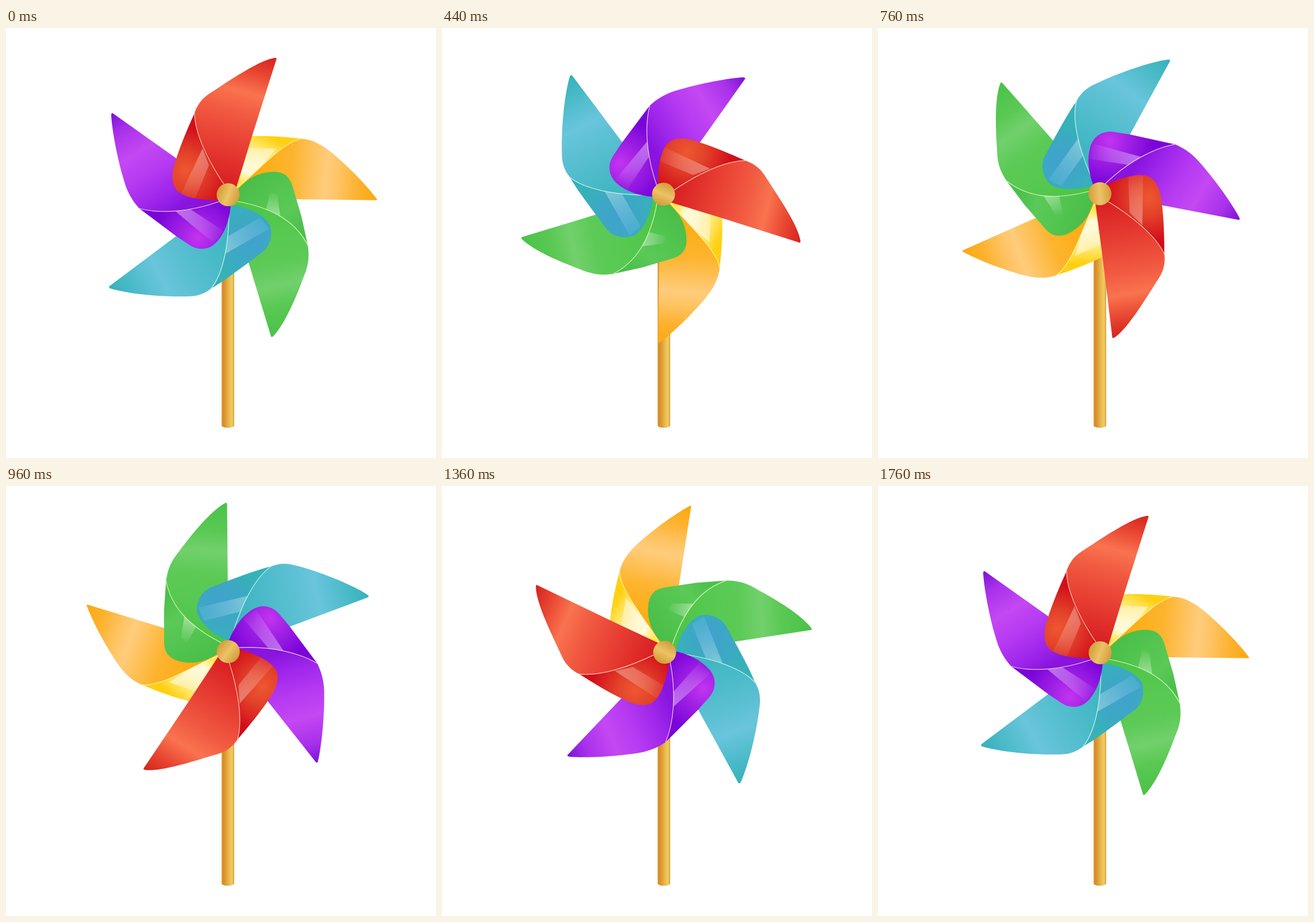
An HTML page that plays this animation: 748 by 748 pixels, repeating every 2 s.

```html
<!DOCTYPE html>
<html lang="en">
<head>
<meta charset="utf-8">
<title>Pinwheel</title>
<style>
  html, body { margin: 0; width: 100%; height: 100%; overflow: hidden; background: #fff; }
  svg { display: block; width: 100vw; height: 100vh; }
</style>
</head>
<body>
<svg id="stage" viewBox="0 0 748 748">
  <defs id="defs"></defs>
  <path d="M375,290H397V692C394,696.5 378,696.5 375,692Z" fill="url(#stick)"/>
  <g id="wheel"></g>
</svg>
<script>
const PIVOT = '386.4 289.1';
const STEP_MS = 40, STEPS = 44, LOOP_MS = 2000;
const defs = document.getElementById('defs');
const wheel = document.getElementById('wheel');

function add(parent, tag, attrs) {
  const el = document.createElementNS('http://www.w3.org/2000/svg', tag);
  for (const key in attrs) el.setAttribute(key, attrs[key]);
  return parent.appendChild(el);
}

// stops: "offset color [opacity]" separated by commas
function gradient(id, coords, stops) {
  const radial = coords.length === 3;
  const names = radial ? ['cx', 'cy', 'r'] : ['x1', 'y1', 'x2', 'y2'];
  const attrs = { id, gradientUnits: 'userSpaceOnUse' };
  names.forEach((name, i) => attrs[name] = coords[i]);
  const el = add(defs, radial ? 'radialGradient' : 'linearGradient', attrs);
  for (const stop of stops.split(',')) {
    const [offset, color, opacity = 1] = stop.trim().split(' ');
    add(el, 'stop', { offset, 'stop-color': color, 'stop-opacity': opacity });
  }
}

// tip: ridge start to the point; edge: point to hub; ridge: the fold, from start to hub;
// flap: from the hub round the folded corner and back to the ridge start
const blades = [
  {
    name: 'yellow', start: '514,192.5', line: '#fff2a8',
    tip: 'C545,195 568,216 604,251 C624,271 639,289 645.5,298 Q646,299.6 643,299.6',
    edge: 'L506,298 L386,295', ridge: 'C480,199 440,248 399,281',
    flap: 'L388,290 L415,189 C440,186.5 485,188.5 514,192.5Z',
    fill: [[400, 270, 645, 290], '0 #fca803, .38 #fdb42e, .63 #ffcc7c, .72 #fec464, .86 #fdb230, 1 #fca80e'],
    flapFill: [[408, 268, 448, 184], '0 #ffe650, .22 #fffbdc, .5 #fff3b0, .74 #ffe668, 1 #ffd010'],
    shine: 'M470,210 L414,208 L405,238 L437,248Z',
    shineFill: [[460, 212, 405, 225], '0 #fff .5, 1 #fff .15']
  },
  {
    name: 'green', start: '525,378', line: '#d6f6b4',
    tip: 'C528,400 526,414 517,435 C504,470 485,515 465,536 Q461.5,539.5 460.5,535',
    edge: 'L422,408 L388,297', ridge: 'C506,340 468,313 399,301',
    flap: 'L390,290 L401,284 C418,262 440,250 467,250 C486,251 494,260 499,277 L514,328 L525,378Z',
    fill: [[430, 305, 480, 540], '0 #4cc546, .25 #57c951, .45 #5bca56, .62 #72d06c, .76 #5ac953, 1 #48c148'],
    flapFill: [[420, 265, 515, 350], '0 #49be48, .4 #53c550, .7 #5bc957, 1 #4cbf4c'],
    shine: 'M452,317 L478,334 L472,290 L460,284Z',
    shineFill: [[464, 328, 465, 282], '0 #fff .42, 1 #fff 0']
  },
  {
    name: 'teal', start: '357,453', line: '#c6f2ee',
    tip: 'C344,463 333,467 313,467 C268,468 210,462 181,453 Q178,451.5 180,449',
    edge: 'L296,362 L387,294', ridge: 'C377,428 389,378 388,303',
    flap: 'L390,300 L392,308 C420,311 448,325 457,339 C465,354 462,377 447,389 L422,408 C400,424 378,441 357,453Z',
    fill: [[185, 455, 390, 345], '0 #38b2bd, .14 #4abac8, .36 #69c5dc, .52 #5cc0d3, .76 #4abac9, 1 #3ab4be'],
    flapFill: [[428, 370, 74], '0 #40a2cd, .5 #3da8c4, 1 #36b2b8'],
    shine: 'M385,363 L442,330 L458,349 L381,393Z',
    shineFill: [[381, 385, 455, 340], '0 #fff .34, 1 #8fd0ff .14']
  },
  {
    name: 'purple', start: '232,314', line: '#f0c4e4',
    tip: 'C222,303 215,292 209,277 C195,236 184,176 183,151 Q183.5,147 186,148.5',
    edge: 'L298,228 L386,290', ridge: 'C266,323 318,321 374,301',
    flap: 'L386,296 L391,306 C389,338 379,358 367,372 C354,386 336,388 320,378 L296,362 L232,314Z',
    fill: [[184, 150, 290, 320], '0 #7d14d8, .16 #a830ea, .4 #c448f3, .62 #b539f1, .85 #9c24ea, 1 #8814de'],
    flapFill: [[333, 366, 76], '0 #c434f0, .4 #a222e6, 1 #7a05d8'],
    shine: 'M295,319 L319,314 L378,353 L361,374Z',
    shineFill: [[305, 314, 368, 364], '0 #fff .4, 1 #fff .04']
  },
  {
    name: 'red', start: '328,148', line: '#fbc6a4',
    tip: 'C331,138 339,123 354,114 C400,84 440,57 467,52 Q471.5,51.5 470.5,54',
    edge: 'L428,188 L399,283 L386,290', ridge: 'C328,182 351,231 382,276',
    flap: 'L386,300 L366,300 C328,299 302,292 294,278 C288,267 288,250 295,231 C303,205 317,172 328,148Z',
    fill: [[436, 32, 374, 265], '0 #d01c1d, .06 #d8261f, .2 #ea4a34, .34 #f9734f, .5 #f15a41, .7 #e94235, 1 #da2124'],
    flapFill: [[312, 248, 76], '0 #ee5731, .4 #e3422a, 1 #d20e1b'],
    shine: 'M342,209 L353,239 L328,299 L305,288Z',
    shineFill: [[348, 222, 316, 294], '0 #fff .33, 1 #fff .06']
  }
];

gradient('stick', [375, 0, 397, 0],
  '0 #e9a23c, .12 #d98a25, .3 #dc9a35, .6 #e9bb50, .82 #f0cc64, 1 #d9a53c');
gradient('hub', [368, 283, 405, 297], '0 #d39d38, .5 #ebc366, 1 #d59c3c');

for (const b of blades) {
  const id = part => b.name + '-' + part;
  gradient(id('main'), ...b.fill);
  gradient(id('flap'), ...b.flapFill);
  gradient(id('shine'), ...b.shineFill);
  const fold = `M${b.start}${b.ridge}`;
  const flap = fold + b.flap;
  const clip = add(defs, 'clipPath', { id: id('clip') });
  add(clip, 'path', { d: flap });
  add(wheel, 'path', { d: flap, fill: `url(#${id('flap')})` });
  add(wheel, 'path', { d: b.shine, fill: `url(#${id('shine')})`, 'clip-path': `url(#${id('clip')})` });

  // The main sheet closes back along the fold, so reverse its curve.
  const [c1, c2, end] = b.ridge.slice(1).split(' ');
  add(wheel, 'path', {
    d: `M${b.start}${b.tip}${b.edge}L${end}C${c2} ${c1} ${b.start}Z`,
    fill: `url(#${id('main')})`
  });
  add(wheel, 'path', { d: fold, fill: 'none', stroke: b.line, 'stroke-width': 1.2 });
}
add(wheel, 'circle', { cx: 386.4, cy: 290.1, r: 20, fill: 'url(#hub)' });

const begin = performance.now();
function draw() {
  const t = (performance.now() - begin) % LOOP_MS;
  const step = Math.min(Math.floor(t / STEP_MS), STEPS);
  wheel.setAttribute('transform', `rotate(${step * 360 / STEPS} ${PIVOT})`);
  requestAnimationFrame(draw);
}
draw();
</script>
</body>
</html>
```
